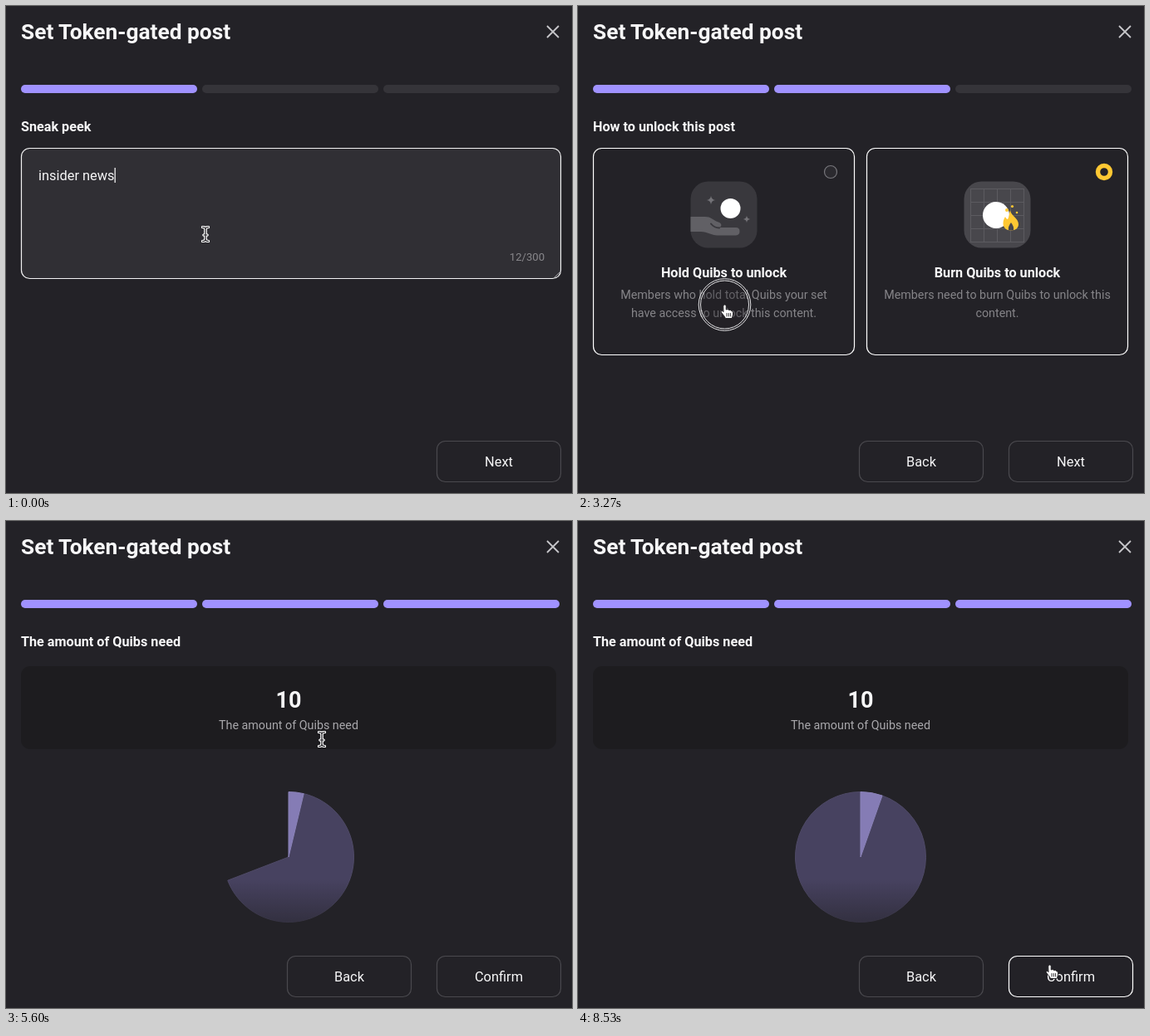
Animation, 681 px wide and 587 px high, one loop 8870 ms. Source, as an HTML page:

```html
<!DOCTYPE html>
<html lang="en">
<head>
<meta charset="utf-8">
<title>Set Token-gated post</title>
<style>
  html, body { margin: 0; width: 100%; height: 100%; overflow: hidden; background: #232227; }
  svg { display: block; width: 100vw; height: 100vh; }
  text { font: 400 16.4px Roboto, "Open Sans", sans-serif; fill: #f7f7f8; }
  .mid { text-anchor: middle; }
  .title { font-size: 26.3px; font-weight: 600; }
  .head { font-size: 16.2px; font-weight: 600; }
  .desc { font-size: 14.3px; fill: #858488; }
  .count { font-size: 13.1px; text-anchor: end; fill: #89888c; }
  .amount { font-size: 27px; font-weight: 700; }
  .caption { font-size: 14.3px; fill: #a9a8ac; }

  .bar { fill: #353439; }
  .bar.on { fill: #a092ff; }
  .frame { fill: none; stroke: #4a494e; stroke-width: 1.2; }
  .hot .frame, .on .frame { stroke: #fff; }
  .area { fill: #302f34; stroke: #f2f2f3; stroke-width: 1.2; }
  .caret { stroke: #fff; stroke-width: 1.2; }
  .hidden { display: none; }

  .radio { fill: #2b2a2f; stroke: #77767b; stroke-width: 1.2; }
  .on .radio { fill: #232227; stroke: #ffc833; stroke-width: 5.4; }
  .tile { fill: #39383d; }
  .on .tile { fill: #48474c; }
  .grid { stroke: #333237; }
  .on .grid { stroke: #5c5b60; }
  .star { fill: #737277; }
  .palm { fill: #616065; }
  .on .palm, .on .star { fill: #fff; }
  .thumb { fill: none; stroke: #39383d; stroke-width: 2; stroke-linecap: round; }
  .on .thumb { stroke: #48474c; }
  .held { fill: #fff; }
  .on .held { fill: #ffc833; }
  .burnt { fill: #616065; }
  .on .burnt { fill: #fff; }
  .fire { fill: #fff; }
  .on .fire { fill: #ffc833; }
  .core { fill: #48474c; }

  #ring circle { fill: none; stroke: #e4e4e6; stroke-width: 1; }
  #ring .disc { fill: #232227; fill-opacity: .35; }
</style>
</head>
<body>
<svg viewBox="0 0 681 587">
  <defs>
    <linearGradient id="fade" x2="0" y2="1">
      <stop stop-color="#232227" stop-opacity="0"/>
      <stop offset="1" stop-color="#232227"/>
    </linearGradient>
    <path id="spark" d="M0-5.2Q.6-.6 5.2 0Q.6 .6 0 5.2Q-.6 .6-5.2 0Q-.6-.6 0-5.2Z"/>
  </defs>

  <text class="title" x="18" y="40">Set Token-gated post</text>
  <path d="M651 24l14 14m0-14l-14 14" stroke="#c6c6c9" stroke-width="1.8"/>
  <rect class="bar" x="18" y="95" width="212" height="10" rx="5"/>
  <rect class="bar" x="236" y="95" width="212" height="10" rx="5"/>
  <rect class="bar" x="454" y="95" width="212" height="10" rx="5"/>
  <text class="head" id="head" x="18" y="151"></text>

  <g class="step">
    <rect class="area" x="18.5" y="171.5" width="649" height="157" rx="10"/>
    <path d="M660 327l6-6m-2.5 6l2.5-2.5" stroke="#a5a4a8"/>
    <text x="39" y="210" id="typed">insider news</text>
    <path class="caret" id="caret1" d="M131.3 195v18"/>
    <text class="count" x="648" y="307">12/300</text>
  </g>

  <g class="step">
    <g id="hold">
      <rect class="frame" x="18.5" y="171.5" width="314" height="249" rx="10"/>
      <circle class="radio" cx="304" cy="200" r="7.5"/>
      <rect class="tile" x="135.5" y="211.5" width="80" height="80" rx="21"/>
      <use class="star" href="#spark" x="160" y="234"/>
      <use class="star" href="#spark" transform="translate(203 257) scale(.8)"/>
      <path class="palm" d="M135.5 254H153C161 254 163 259 169 260.500C174 262 173 267 169 267H190Q194.500 267 194.500 271.500T190 276.500H168C160 276.500 156 272 148 272H135.500Z"/>
      <path class="thumb" d="M160 262.500Q164 267.500 170 267.500"/>
      <circle class="held" cx="183.500" cy="244" r="12"/>
      <text class="head mid" x="175.500" y="327">Hold Quibs to unlock</text>
      <text class="desc mid" x="175.500" y="353">Members who hold total Quibs your set</text>
      <text class="desc mid" x="175.500" y="375">have access to unlock this content.</text>
    </g>
    <g id="burn">
      <rect class="frame" x="347.5" y="171.5" width="314" height="249" rx="10"/>
      <circle class="radio" cx="633" cy="200" r="7.5"/>
      <rect class="tile" x="464.5" y="211.5" width="80" height="80" rx="21"/>
      <path class="grid" d="M472 220.500h65m-65 16h65m-65 16h65m-65 16h65m-65 16h65M472.500 220v65m16-65v65m16-65v65m16-65v65m16-65v65"/>
      <circle class="burnt" cx="503" cy="252" r="16"/>
      <g class="fire">
        <path d="M520 246C521 253 530 256 530 263C530 268 526 270.500 521 270.500S511.500 268 511.500 262C511.500 258 513 256 514 254C515 256 516 257 517 257C519 254 518.500 250 520 246Z"/>
        <circle cx="516" cy="246" r="2"/>
        <circle cx="522.500" cy="241.500" r="1.6"/>
        <circle cx="528" cy="249" r="1.300"/>
      </g>
      <path class="core" d="M521 261Q525 266 524 270.500H518Q517 266 521 261Z"/>
      <text class="head mid" x="504.500" y="327">Burn Quibs to unlock</text>
      <text class="desc mid" x="504.500" y="353">Members need to burn Quibs to unlock this</text>
      <text class="desc mid" x="504.500" y="375">content.</text>
    </g>
  </g>

  <g class="step">
    <rect x="18" y="175" width="644" height="100" rx="11" fill="#1d1c1f"/>
    <text class="amount mid" x="340" y="225">10</text>
    <path class="caret" id="caret3" d="M355.500 197v35"/>
    <text class="caption mid" x="340" y="251">The amount of Quibs need</text>
    <path id="rest" fill="#474260" stroke="#4f4a67"/>
    <path id="slice" fill="#857cb5" stroke="#8a82b8"/>
    <rect x="255" y="432" width="170" height="92" fill="url(#fade)"/>
  </g>

  <g id="back">
    <rect class="frame" x="338.500" y="524.500" width="149" height="49" rx="10"/>
    <text class="mid" x="413" y="555">Back</text>
  </g>
  <g id="next">
    <rect class="frame" x="518.500" y="524.500" width="149" height="49" rx="10"/>
    <text class="mid" id="nextLabel" x="593" y="555"></text>
  </g>

  <g id="ring">
    <circle class="disc" r="31.300"/>
    <circle r="29"/>
  </g>
  <g id="cursor" stroke-linejoin="round" stroke-linecap="round">
    <g id="beam" fill="none">
      <path id="beamPath" d="M-3.500-8.500Q0-8.500 0-6Q0-8.500 3.500-8.500M0-6V6M-3.500 8.500Q0 8.500 0 6Q0 8.500 3.500 8.500M-2 1H2" stroke="#fff" stroke-width="3.200"/>
      <use href="#beamPath" id="beamCore"/>
      <path d="M-3.500-8.500Q0-8.500 0-6Q0-8.500 3.500-8.500M0-6V6M-3.500 8.500Q0 8.500 0 6Q0 8.500 3.500 8.500M-2 1H2" stroke="#1b1a1e" stroke-width="1.200"/>
    </g>
    <path id="arrow" d="M0 0V14.500L3.400 11.400L5.700 16.500L8 15.500L5.800 10.500H10.300Z" fill="#111" stroke="#fff"/>
    <g id="hand">
      <path d="M-1.700 1.700Q-1.700 0 0 0T1.700 1.700V6Q4 4.800 5 6.500Q7.200 5.800 8 7.500Q10 7.300 10 9.500V12Q9.600 14 8.600 16.500H1Q0 14-2 12L-4.300 9Q-4.600 7.200-2.800 7.400L-1.700 8.400Z" fill="#fff" stroke="#1b1a1e" stroke-width=".9"/>
      <path d="M2.500 10.500v3.500m2.300-3.500v3.500m2.300-3.500v3.500" stroke="#1b1a1e" stroke-width=".9"/>
    </g>
  </g>
</svg>
<script>
  const LOOP = 8870, STEP2 = 1460, STEP3 = 5040, SELECT = 3395;
  const HEADS = ["Sneak peek", "How to unlock this post", "The amount of Quibs need"];
  const CLICKS = [[1330, 1460], [3265, 3395], [4925, 5040]];
  // Cursor legs: start, end, destination
  const START = [240, 275];
  const LEGS = [
    [150, 1300, 610.5, 562],
    [1900, 2760, 176.5, 360],
    [3850, 4460, 562, 540],
    [5090, 5590, 380, 263],
    [5810, 6320, 354.5, 248.5],
    [6590, 7720, 567.5, 535]
  ];
  const PIE = { x: 340, y: 405, r: 78.5, start: 5215, time: 950, share: 19.4 };

  const $ = id => document.getElementById(id);
  const bars = document.querySelectorAll(".bar");
  const steps = document.querySelectorAll(".step");
  const clamp = v => Math.min(1, Math.max(0, v));
  const show = (el, on) => el.classList.toggle("hidden", !on);
  const blink = t => t % 1000 < 500;
  const sine = p => .5 - .5 * Math.cos(Math.PI * p);

  // cubic-bezier(.25, .1, .25, 1)
  function ease(p) {
    const curve = (a, b, u) => 3 * a * u * (1 - u) ** 2 + 3 * b * u * u * (1 - u) + u ** 3;
    let lo = 0, hi = 1;
    for (let i = 0; i < 24; i++) {
      const u = (lo + hi) / 2;
      if (curve(.25, .25, u) < p) lo = u; else hi = u;
    }
    return curve(.1, 1, hi);
  }

  function cursorAt(t) {
    let [x, y] = START;
    for (const [from, to, tx, ty] of LEGS) {
      const p = sine(clamp((t - from) / (to - from)));
      x += (tx - x) * p;
      y += (ty - y) * p;
    }
    return [x, y];
  }

  function sector(a, b) {
    const point = deg => {
      const rad = deg * Math.PI / 180;
      return (PIE.x + PIE.r * Math.sin(rad)).toFixed(2) + " " + (PIE.y - PIE.r * Math.cos(rad)).toFixed(2);
    };
    return `M${PIE.x} ${PIE.y}L${point(a)}A${PIE.r} ${PIE.r} 0 ${b - a > 180 ? 1 : 0} 1 ${point(b)}Z`;
  }

  function drawPie(t) {
    const p = ease(clamp((t - PIE.start) / PIE.time));
    const shown = t > PIE.start;
    show($("slice"), shown);
    show($("rest"), shown);
    $("slice").setAttribute("d", sector(0, PIE.share * p));
    $("rest").setAttribute("d", sector(PIE.share * p, 360 * p));
  }

  function drawCursor(x, y, step) {
    const over = (l, top, r, b) => x >= l && x <= r && y >= top && y <= b;
    const hover = {
      hold: step === 1 && over(18, 171, 333, 421),
      burn: step === 1 && over(347, 171, 662, 421),
      back: step > 0 && over(338, 524, 488, 574),
      next: over(518, 524, 668, 574)
    };
    for (const id in hover) $(id).classList.toggle("hot", hover[id]);
    const field = step === 0 && over(18, 171, 668, 329) || step === 2 && over(18, 175, 662, 275);
    const press = Object.values(hover).some(Boolean);
    show($("beam"), field);
    show($("hand"), press);
    show($("arrow"), !field && !press);
    const place = `translate(${x.toFixed(2)} ${y.toFixed(2)})`;
    $("cursor").setAttribute("transform", place);
    $("ring").setAttribute("transform", place);
  }

  function draw(t) {
    const step = t < STEP2 ? 0 : t < STEP3 ? 1 : 2;
    steps.forEach((el, i) => show(el, i === step));
    bars.forEach((el, i) => el.classList.toggle("on", i <= step));
    $("head").textContent = HEADS[step];
    $("nextLabel").textContent = step === 2 ? "Confirm" : "Next";
    show($("back"), step > 0);
    $("hold").classList.toggle("on", t >= SELECT);
    $("burn").classList.toggle("on", t < SELECT);
    show($("caret1"), t < CLICKS[0][0] && blink(t));
    show($("caret3"), step === 2 && blink(t - 5030));
    show($("ring"), CLICKS.some(([a, b]) => t >= a && t < b));
    drawPie(t);
    drawCursor(...cursorAt(t), step);
  }

  // Keep the caret right behind the typed text
  const end = 39 + $("typed").getComputedTextLength() + .6;
  $("caret1").setAttribute("d", `M${end} 195v18`);

  const began = performance.now();
  function tick() {
    draw((performance.now() - began) % LOOP);
    requestAnimationFrame(tick);
  }
  tick();
</script>
</body>
</html>
```
